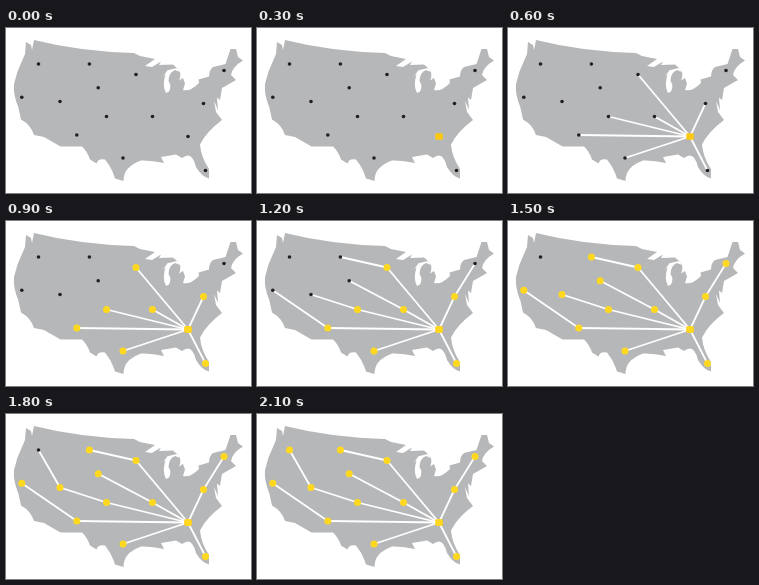
Animation, 245 px wide and 165 px high, one loop 2400 ms. Source, as an HTML page:

```html
<!DOCTYPE html>
<html lang="en">
<head>
<meta charset="utf-8">
<title>Network spreading over a map</title>
<style>
  html, body { margin: 0; width: 100%; height: 100%; overflow: hidden; background: #fff; }
  svg { display: block; width: 245px; height: 165px; }
  .land { fill: #b6b7b9; }
  .lake { fill: #fff; }
  .city { fill: #231f20; }
  .lit { fill: #ffd81f; }
  .seed { fill: #fdc910; }
  line { stroke: #fff; stroke-width: 1.8; }
  .step { animation: 2400ms step-end infinite; }
</style>
</head>
<body>
<svg id="stage" viewBox="0 0 245 165" xmlns="http://www.w3.org/2000/svg">
  <!-- northern border and lakes, Atlantic, Gulf, southern border, Pacific -->
  <path class="land" d="M20 14L25 17 26 22 28 12Q74 23.5 128 25
    L134 28 149 31 139 38 146 39 155 33.5 153 37 167 36.5 171 40 174 44Q175 49 173 52.5
    L177 50 179 55.5 177 62Q184 64 193 55L192.5 51.5 203 48.5Q203 42 207 39L219.5 36
    224.5 21 230 21 232 29 237 32.5Q226 39 225 47L230 52 216 60 214 72
    211 69.5 212 82 208 73 210 84 216 92Q200 104 194 116.5
    Q195 129 203 141L203 150.5Q196 149 190 139
    Q186 122 176 130L170 126.5 155 129 158 135Q145 132 135 132.5Q117 139 117.6 153
    L109 150.5Q106 140 99 131.5Q92 130 90.5 135.5L84 131.5Q81 123 76 118.5
    L54.5 118.5 38 109 28 107
    Q25 97 15 91.5L12.4 79.5Q7 67 8 56L11.5 43.5 19 26Z"/>
  <path class="lake" d="M161.5 42.2L156.5 49 159.5 46Q156 58 160 65L163 63.5
    Q166 58 162.5 53Q163 44 169 42L174 44 171 40Z"/>
</svg>
<script>
const stage = document.getElementById('stage');
const STEPS = 8;

function add(tag, attrs) {
  const el = document.createElementNS(stage.namespaceURI, tag);
  for (const key in attrs) el.setAttribute(key, attrs[key]);
  stage.append(el);
}

// Keyframes s1 to s7: shown from that step until the loop ends
const rules = [];
for (let i = 1; i < STEPS; i++) {
  const from = i * 100 / STEPS;
  rules.push(`.s${i} { animation-name: s${i} }
    @keyframes s${i} { 0% { visibility: hidden } ${from}%, 100% { visibility: visible } }`);
}
const style = document.createElement('style');
style.textContent = rules.join('\n');
document.head.append(style);

// Each chain of cities grows outwards from the hub
const hub = [182, 108.5];
const chains = [
  [[130, 46.5], [83.4, 36]],
  [[100.5, 88.5], [54, 73.5], [32.5, 36]],
  [[146.5, 88.5], [92.2, 59.7]],
  [[197.5, 75.5], [218, 42.5]],
  [[70.8, 107], [15.8, 69.2]],
  [[117, 130]],
  [[199.5, 142.5]]
];
const links = chains.flatMap(chain =>
  chain.map((to, i) => ({ from: i ? chain[i - 1] : hub, to, step: 2 * (i + 1) })));

for (const { from: [x1, y1], to: [x2, y2], step } of links) {
  add('line', { class: 'step s' + step, x1, y1, x2, y2 });
}
const cities = [{ to: hub, step: 2 }, ...links];
for (const { to: [cx, cy] } of cities) add('circle', { class: 'city', cx, cy, r: 1.8 });

// The hub lights up first as a small block
add('rect', { class: 'seed step s1', x: 178.3, y: 105.2, width: 7.5, height: 6.6, rx: 1.4 });
for (const { to: [cx, cy], step } of cities) {
  add('circle', { class: 'lit step s' + (step + 1), cx, cy, r: 3.5 });
}
</script>
</body>
</html>
```
